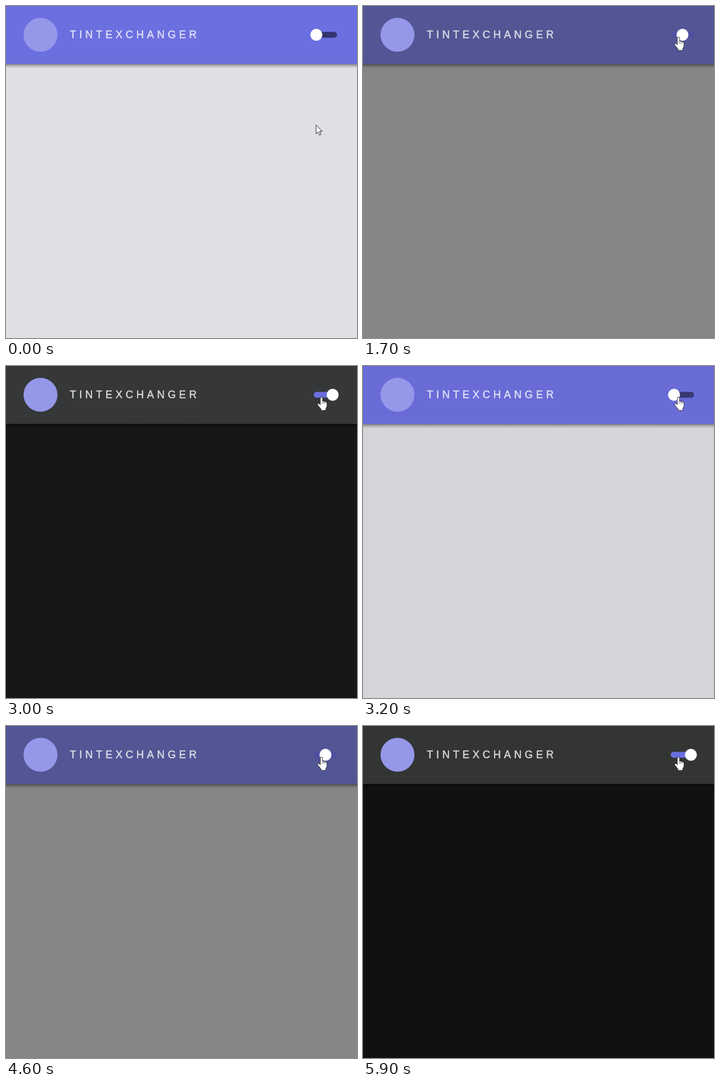
Animation, 600 px wide and 568 px high, one loop 6000 ms. Source, as an HTML page:

```html
<!DOCTYPE html>
<html lang="en">
<head>
<meta charset="utf-8">
<title>Theme toggle</title>
<style>
  html, body { margin: 0; width: 100%; height: 100%; overflow: hidden; }
  svg { display: block; width: 100%; height: 100%; }
  text { font: 17.8px "Liberation Sans", Arial, sans-serif; letter-spacing: 5.4px; }
  .cursor { stroke: #25252b; stroke-linejoin: round; }
</style>
</head>
<body>
<svg viewBox="0 0 600 568">
  <defs>
    <linearGradient id="fade" x1="0" y1="0" x2="0" y2="1">
      <stop offset="0" stop-opacity=".45"/>
      <stop offset=".45" stop-opacity=".2"/>
      <stop offset="1" stop-opacity="0"/>
    </linearGradient>
  </defs>
  <rect id="page" width="600" height="568"/>
  <rect y="99" width="600" height="7.5" fill="url(#fade)"/>
  <rect id="header" width="600" height="99"/>
  <circle cx="59" cy="49.2" r="29" fill="#9597e9"/>
  <g id="title" stroke-width=".4">
    <text x="109" y="55">TINTEXCHANGER</text>
  </g>
  <rect id="track" x="526" y="44.2" width="40" height="10" rx="5"/>
  <circle id="knob" cy="49.3" r="10.2" fill="#fff"/>
  <g id="arrow" class="cursor">
    <path fill="#fff" d="M.5 .5V15.6L4 12.4L6.3 17.8L8.8 16.8L6.5 11.5H11Z"/>
  </g>
  <g id="hand" class="cursor" transform="translate(532.3 53)">
    <path fill="#fff" stroke-width="1.6" paint-order="stroke" d="M5.4 2A1.5 1.5 0 0 1 8.4 2V7.6Q9.8 6.6 11 8Q12.6 7.2 13.6 8.8Q16 8.4 16 11V15Q16 17.5 14 19.5V22.5H6.5V20.5L1.2 14Q0 12 2 11.6Q3.6 11.8 5.4 14Z"/>
    <path fill="none" stroke-width=".7" d="M8.4 7.6V11.5M11 8V11.5M13.6 8.8V11.5"/>
  </g>
</svg>
<script>
const LOOP = 6000, STEP = 100, FADE = 300;
const TOGGLES = [1621, 2987, 4521];
const KNOB_LEAD = 12;
const HAND_AT = 900;
const COLORS = {
  page: [[222, 224, 228], [16, 18, 15]],
  header: [[108, 111, 224], [51, 53, 51]],
  track: [[52, 53, 110], [108, 111, 224]],
  title: [[226, 227, 246], [220, 220, 220]]
};

const el = id => document.getElementById(id);
const clamp = v => Math.min(1, Math.max(0, v));
const lerp = (a, b, p) => a + (b - a) * p;
const mix = ([a, b], p) => `rgb(${a.map((v, i) => Math.round(lerp(v, b[i], p)))})`;
const bez = (a, b, u) => 3 * a * u * (1 - u) ** 2 + 3 * b * u * u * (1 - u) + u ** 3;

// cubic-bezier(.25, .1, .25, 1), solved by bisection
function ease(x) {
  if (x <= 0 || x >= 1) return clamp(x);
  let lo = 0, hi = 1;
  for (let i = 0; i < 24; i++) {
    const mid = (lo + hi) / 2;
    if (bez(.25, .25, mid) < x) lo = mid; else hi = mid;
  }
  return bez(.1, 1, lo);
}

// 0 = light theme, 1 = dark theme
const darkness = t => TOGGLES.reduce(
  (sum, start, i) => sum + (i % 2 ? -1 : 1) * ease((t - start) / FADE), 0);

function draw(t) {
  const dark = darkness(t);
  for (const id in COLORS) el(id).setAttribute("fill", mix(COLORS[id], dark));
  el("title").setAttribute("stroke", mix(COLORS.title, dark));
  el("knob").setAttribute("cx", lerp(530.5, 560.5, darkness(t + KNOB_LEAD)));

  const s = clamp(t / 700), p = s * s * (3 - 2 * s);
  el("arrow").setAttribute("transform", `translate(${lerp(529.5, 538.5, p)} ${lerp(203, 56.5, p)})`);
  el("arrow").style.display = t < HAND_AT ? "" : "none";
  el("hand").style.display = t < HAND_AT ? "none" : "";
}

const origin = performance.now();
function tick() {
  const t = (performance.now() - origin) % LOOP;
  draw(Math.floor(t / STEP) * STEP);
  requestAnimationFrame(tick);
}
tick();
</script>
</body>
</html>
```
